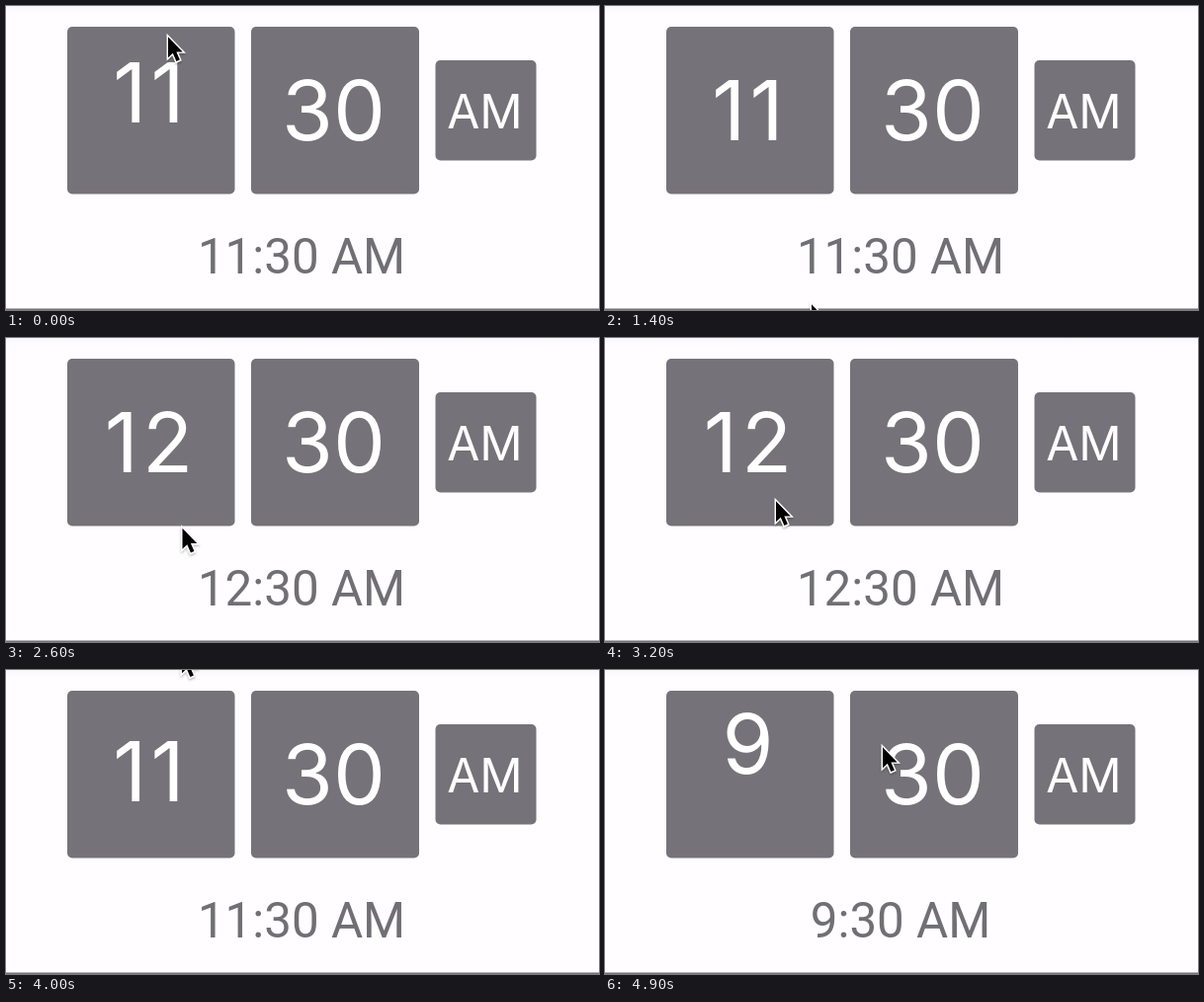
Animation of 600x308 px, one loop 5000 ms. Source, as an HTML page:

```html
<!DOCTYPE html>
<html lang="en">
<head>
<meta charset="utf-8">
<title>Time picker</title>
<style>
  html, body { margin: 0; width: 100%; height: 100%; overflow: hidden; background: #fffdff; }
  svg { display: block; width: 600px; height: 308px; }
  .tile { fill: #767279; }
  .face { fill: #fff; font: 400 84px Inter, "Open Sans", sans-serif; text-anchor: middle; }
  .hour { letter-spacing: 4px; }
  .small { font-size: 48px; }
  .label { fill: #706f73; font: 400 49.3px Roboto, Arial, sans-serif; text-anchor: middle; }
</style>
</head>
<body>
<svg viewBox="0 0 600 308">
  <defs>
    <linearGradient id="shade" x2="0" y2="1">
      <stop offset="0" stop-color="#f8f7f9"/>
      <stop offset="1" stop-color="#fffdff"/>
    </linearGradient>
    <clipPath id="window"><rect x="62" y="21" width="169.5" height="169.5" rx="5"/></clipPath>
    <filter id="soft" x="-50%" y="-50%" width="200%" height="200%">
      <feDropShadow dx="0" dy="1.5" stdDeviation="1.2" flood-opacity=".3"/>
    </filter>
  </defs>
  <rect width="600" height="308" fill="#fffdff"/>
  <rect width="600" height="8" fill="url(#shade)"/>
  <rect y="306.5" width="600" height="1.5" fill="#747276"/>

  <rect class="tile" x="62" y="21" width="169.5" height="169.5" rx="5"/>
  <rect class="tile" x="248" y="21" width="170" height="169.5" rx="5"/>
  <rect class="tile" x="434.5" y="55" width="102" height="101.5" rx="5"/>

  <g clip-path="url(#window)"><g id="wheel"></g></g>
  <text class="face" x="331.5" y="136">30</text>
  <text class="face small" x="484.5" y="124">AM</text>
  <text class="label" id="label" x="299" y="271"></text>

  <g id="cursor" filter="url(#soft)">
    <path d="M1 2.2V23.2L5.8 18.7 9.4 27.1 12.9 25.6 9.4 17.4H15.7Z"
      fill="#000" stroke="#fff" stroke-width="2.8" paint-order="stroke"/>
  </g>
</svg>
<script>
const LOOP = 5000, STEP = 100, PITCH = 169, BASE = 136, STIFF = 9.5;
const $ = id => document.getElementById(id);

// Moments at which the hour wheel is flicked
const START_HOUR = 12;
const flicks = [
  { at: -400, by: -1 }, { at: 1400, by: 1 }, { at: 3390, by: -1 },
  { at: 4050, by: -1 }, { at: 4570, by: -1 }
];

// Where the pointer turns or rests: time, x, y
const turns = [
  [0, 163, 29], [300, 176, 229], [600, 177, 123], [700, 177, 123],
  [1200, 221, 298], [1400, 208, 300], [1900, 176, 107], [2100, 178, 262],
  [2400, 178, 111], [2500, 178, 111], [2700, 177, 270], [2800, 177, 270],
  [3200, 172, 163], [3400, 174, 42], [3600, 177, 152], [4000, 177, -20],
  [4300, 178, 150], [4600, 180, 5], [4900, 280, 76]
];

const faces = [12, 11, 10, 9].map(hour => {
  const el = document.createElementNS("http://www.w3.org/2000/svg", "text");
  el.setAttribute("class", "face hour");
  el.setAttribute("x", 146.5);
  el.textContent = hour;
  $("wheel").append(el);
  return { hour, el };
});

// Critically damped approach from 0 to 1
function settle(ms) {
  const x = STIFF * Math.max(0, ms) / 1000;
  return 1 - (1 + x) * Math.exp(-x);
}

function pointer(t) {
  const i = turns.findIndex(p => p[0] > t);
  if (i < 0) return turns[turns.length - 1].slice(1);
  const [t0, x0, y0] = turns[i - 1], [t1, x1, y1] = turns[i];
  const u = (1 - Math.cos(Math.PI * (t - t0) / (t1 - t0))) / 2;
  return [x0 + (x1 - x0) * u, y0 + (y1 - y0) * u];
}

function draw(t) {
  let pos = START_HOUR, hour = START_HOUR;
  for (const { at, by } of flicks) {
    pos += by * settle(t - at);
    if (t > at) hour += by;
  }
  for (const f of faces) f.el.setAttribute("y", BASE + (f.hour - pos) * PITCH);
  $("label").textContent = hour + ":30 AM";
  $("cursor").setAttribute("transform", `translate(${pointer(t)})`);
}

function tick() {
  const t = performance.now() % LOOP;
  draw(Math.floor(t / STEP) * STEP);
  requestAnimationFrame(tick);
}
tick();
</script>
</body>
</html>
```
